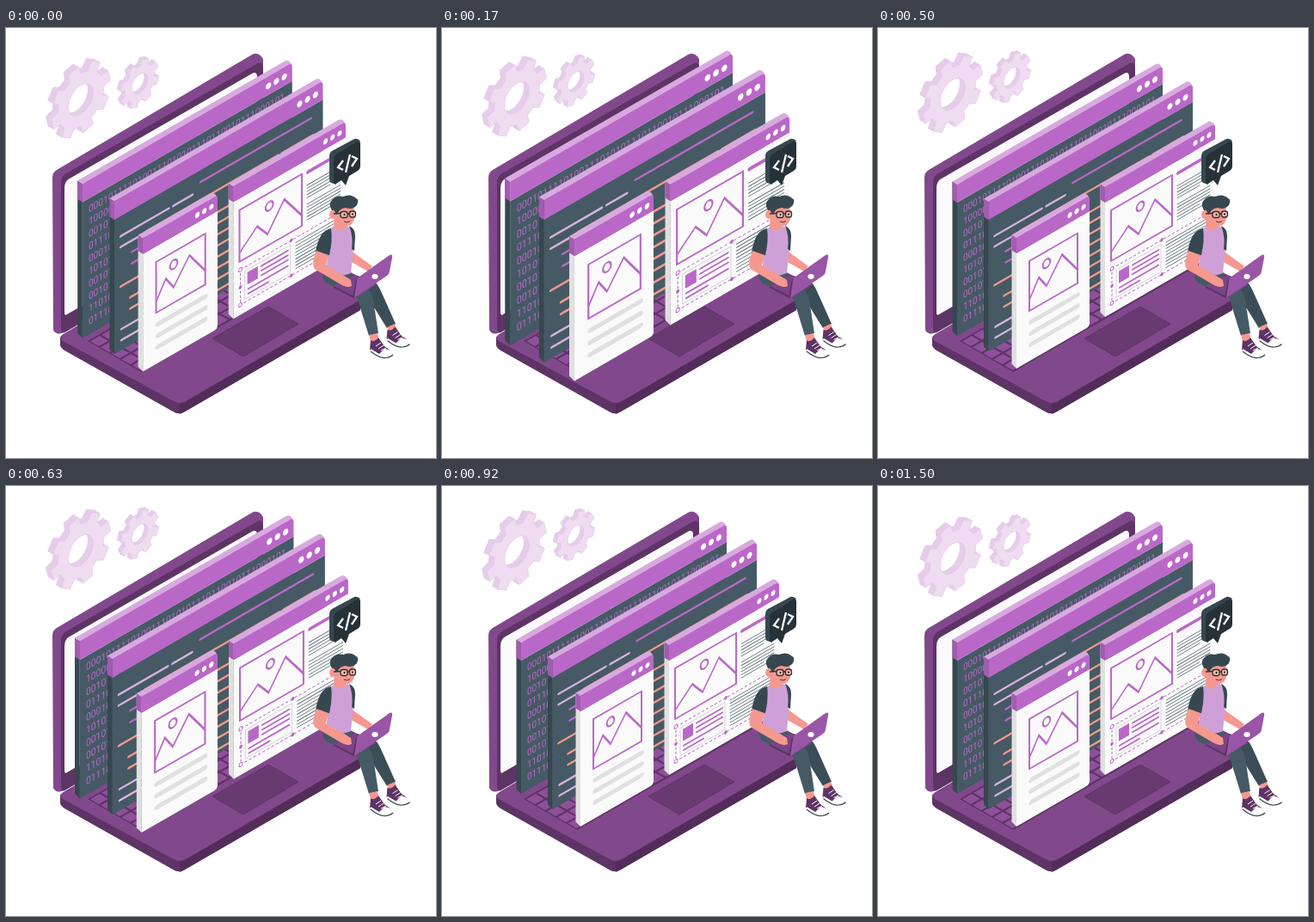
Animation of 500x500 px, one loop 1.54 s. Source, as an HTML page:

```html
<!DOCTYPE html>
<html lang="en">
<head>
<meta charset="utf-8">
<title>Web development</title>
<style>
html, body { margin: 0; width: 100%; height: 100%; overflow: hidden; background: #fff; }
svg { display: block; width: 100vw; height: 100vh; }
text { font: 11.5px Roboto, Arial, sans-serif; fill: #ba68c8; }
</style>
</head>
<body>
<svg viewBox="0 0 500 500">
  <g id="gears"></g>

  <g id="lid">
    <path fill="#82488c" d="M54 174Q54 168 59 165L286 31Q291 28 296 32L299 36V220L68 354Q58 358 55 351Z"/>
    <path fill="#5d3465" d="M64 180Q64 173 70 169L291 42Q299 37 299 47V220L68 354Q64 355 64 349Z"/>
    <path fill="#fafafa" d="M68 186Q68 178 74 175L286 53Q292 50 292 57V205L71 333Q68 335 68 331Z"/>
  </g>

  <g id="base">
    <path fill="#5d3465" d="M63 359V369Q64 373 70 376L196 447Q202 450 208 446L412 328V300Z"/>
    <path fill="#532d5a" d="M202 436V449L208 446L412 328V310Z"/>
    <path fill="#82488c" d="M68 355Q59 360 68 365L195 434Q202 438 209 434L412 316V290L290 225Z"/>
    <g id="keys" transform="matrix(.866 -.5 .866 .5 95 364)"></g>
    <path fill="#693a72" stroke="#5d3465" d="M240 361L305 324L340 344L276 382Z"/>
  </g>

  <g id="windows"></g>

  <g id="bubble">
    <path fill="#37474f" d="M376 148Q376 145 379 143L405 129Q408 128 412 131L384 150L384 182L378 180Q376 179 376 176Z"/>
    <path fill="#263238" d="M381 152Q381 149 384 147L408 132Q412 130 412 134V161Q412 164 409 166L399 172L395 183L390 177L384 181Q381 182 381 179Z"/>
    <path fill="none" stroke="#fff" stroke-width="2.3" d="M392 154L386 162L392 165M400 147L395 168M402 149L408 152L402 161"/>
  </g>

  <g id="person">
    <g fill="#455a64">
      <path d="M396 285L424 292Q432 296 436 306L453 344L443 349L420 312Z" fill="#3b4d57"/>
      <path d="M369 282Q366 292 374 298L398 307Q407 310 410 319L422 358L433 355L427 316Q424 302 412 296L398 283Z"/>
    </g>
    <g fill="#f5988f">
      <path d="M443 348L452 344L455 352L447 355Z"/>
      <path d="M422 357L432 355L434 364L425 367Z"/>
    </g>
    <g id="shoe">
      <path fill="#5d3465" d="M424 363Q428 366 433 360L440 370L447 375L436 381L423 374Z"/>
      <path fill="#fff" d="M440 373Q449 374 450 379Q446 384 438 383L424 376V373L434 379Z"/>
      <path fill="none" stroke="#37474f" stroke-width="1.2" d="M424 376Q434 384 441 383.500Q447 383 450 380"/>
      <path fill="none" stroke="#fff" d="M430 370L436 366M433 373L439 369M436 375L442 372"/>
    </g>
    <use href="#shoe" x="19.500" y="-12.500"/>

    <path fill="#f5988f" d="M400 258L408 264L426 277L421 283L398 270Z"/>
    <path fill="#cfa0d8" d="M377 234L387 228L402 232Q406 240 404 256L401 285Q386 292 372 284L375 258Z"/>
    <path fill="#37474f" d="M378 233Q364 235 360 261Q368 266 376 264Q380 247 378 233ZM399 230Q406 233 406 242L405 259L402 257Q404 242 399 230Z"/>

    <path fill="#f5988f" d="M382 216L381 232Q388 239 395 232L396 224Z"/>
    <path fill="#f5988f" d="M381 206Q377 214 382 222Q386 231 394 231Q405 230 405.500 218L404 204Z"/>
    <ellipse cx="380" cy="217" rx="4" ry="5" fill="#f5988f"/>
    <path fill="#37474f" d="M383 215Q382 211 379 212Q374 204 380 199Q384 194 392 196Q401 192 407 198Q411 199 408 206Q403 212 395 209Q388 210 386 215Z"/>
    <g fill="none" stroke="#263238" stroke-width="1.300">
      <rect x="389" y="213.500" width="8" height="7" rx="2.500" fill="#f7b6ad"/>
      <rect x="399.500" y="213" width="7" height="7" rx="2.500" fill="#f7b6ad"/>
      <path d="M381 216L389 215.500M397 216H399.500"/>
      <path d="M393 225Q397 227 400 224.500" stroke-width=".9"/>
    </g>
    <circle cx="393.500" cy="217" r="1"/><circle cx="403" cy="216.500" r="1"/>

    <path fill="#7b4486" d="M381 300L405 287L430 299L405 314Z"/>
    <path fill="#5d3465" d="M381 300L405 312V314.500L381 302Z"/>
    <path fill="#f5988f" d="M361 259Q354 276 360 281L389 298Q397 303 402 300L401 293L393 288L372 276L375 264Z"/>
    <path fill="#5d3465" d="M405 314L409 293L407 292L403 312Z"/>
    <path fill="#9a56a6" d="M408 294Q408 291 411 289L446 264Q450 262 449 267L446 283Q446 286 443 288L405 314Z"/>
    <ellipse cx="429" cy="289" rx="3.600" ry="3" fill="#fff"/>
  </g>
</svg>

<script>
const PURPLE = '#ba68c8', LILAC = '#d9b3e0', SALMON = '#f5988f', GREY = '#e0e0e0', DARK = '#455a64';
const SLOPE = 0.577;
const $ = id => document.getElementById(id);
const repeat = (n, fn) => Array.from({ length: n }, (_, i) => fn(i)).join('');

// Horizontal stroke in window coordinates
const line = (x0, x1, y, color, width = 2.6) =>
  `<path d="M${x0} ${y}H${x1}" stroke="${color}" stroke-width="${width}" stroke-linecap="round"/>`;

const dot = (x, y, rx, fill = '#fff', stroke = 'none') =>
  `<ellipse cx="${x}" cy="${y}" rx="${rx}" ry="${rx * 1.155}" fill="${fill}" stroke="${stroke}"/>`;

function appWindow({ x, y, w, h, bar, face, side, dots, content }) {
  const dx = -5.5, dy = -6.7;
  return `<g transform="matrix(1 ${-SLOPE} 0 1 ${x} ${y})">
    <path fill="${side}" d="M0 0L${dx} ${dy}V${h + dy - 2}L0 ${h}Z"/>
    <path fill="#a45bb1" d="M0 0L${dx} ${dy}V${bar + dy}L0 ${bar}Z"/>
    <path fill="#d8a9df" d="M0 0L${dx} ${dy}H${w + dx - 3}Q${w - 3} ${dy} ${w} 4Z"/>
    <path fill="${face}" d="M0 ${bar}H${w}V${h - 4}Q${w} ${h} ${w - 4} ${h}H0Z"/>
    <path fill="${PURPLE}" d="M0 0H${w - 4}Q${w} 0 ${w} 5V${bar}H0Z"/>
    ${dots.map(u => dot(u, bar / 2 + 0.3, w > 200 ? 3 : 2.6)).join('')}
    ${content}</g>`;
}

const picture = (x, y, w, h, sunX, sunY, peaks) => `<g fill="none" stroke="${PURPLE}" stroke-width="2">
  <rect x="${x}" y="${y}" width="${w}" height="${h}"/>
  ${dot(sunX, sunY, 4.3, 'none', PURPLE)}<path d="M${peaks}"/></g>`;

const bits = ['0001011110100111010101110110010111000101', '100001', '001010', '011101', '000101',
  '101011', '001010', '001011', '110100', '011101'];
const binary = '<g transform="scale(.866 1)">' +
  bits.map((row, i) => `<text x="8" y="${37 + i * 14.2}">${row}</text>`).join('') + '</g>';

const code = [
  [98, 224, 34.6, PURPLE], [7, 62, 43.8, LILAC], [67, 89, 43.8, LILAC],
  [7, 30, 56, LILAC], [36, 186, 55, SALMON], [191, 226, 55, SALMON],
  [20, 60, 69, PURPLE], [20, 60, 82, PURPLE], [7, 60, 101, SALMON],
  [18, 60, 119.7, SALMON], [18, 60, 132.4, SALMON], [8, 60, 150, LILAC], [8, 60, 162.6, LILAC]
].map(a => line(...a)).join('') + repeat(8, i => line(100, 140, 80 + i * 12.7, SALMON));

const card = picture(15, 35.7, 56, 58, 35, 50, '15 81L26 61L35 76L53 50L71 78') +
  repeat(3, i => line(17, 71, 107.5 + i * 13, GREY, 5.5));

const article = picture(7, 31, 71, 59, 41, 46, '7 80L27 61L39 77L58 48L78 78') +
  line(85, 120, 32.5, PURPLE, 4) +
  repeat(12, i => i == 5 ? '' : line(84, i % 6 == 4 ? 110 : 122, 47 + i * 3.6, DARK, 0.8)) +
  repeat(9, i => line(71, 121, 105 + i * 3.7, DARK, 0.8)) +
  `<rect x="8" y="99.500" width="116" height="40" fill="none" stroke="${PURPLE}" stroke-dasharray="3 2"/>
   <rect x="13" y="104" width="52" height="32" fill="none" stroke="#ccc" stroke-width=".7"/>
   <rect x="16" y="107" width="12" height="14" fill="${PURPLE}"/>` +
  repeat(3, i => line(32, 62, 109 + i * 5.3, PURPLE, 2)) +
  repeat(2, i => line(17, 62 - i * 22, 126.5 + i * 5.3, PURPLE, 2)) +
  dot(8, 99.5, 1.9, '#fff', PURPLE) + dot(8, 139.5, 1.9, '#fff', PURPLE) +
  dot(8, 119.5, 1.8, PURPLE) + dot(66, 99.5, 1.8, PURPLE) + dot(66, 139.5, 1.8, PURPLE);

const dark = { face: DARK, side: '#37474f' }, light = { face: '#fafafa', side: GREY };
$('windows').innerHTML = [
  { x: 92, y: 182, w: 239, h: 176, bar: 21, ...dark, dots: [212, 221, 230], content: binary },
  { x: 128.5, y: 202, w: 237.5, h: 174, bar: 21, ...dark, dots: [211, 220, 229], content: code },
  { x: 161, y: 244, w: 85, h: 152, bar: 18, ...light, dots: [62, 70, 78], content: card },
  { x: 264, y: 185, w: 128, h: 151, bar: 18, ...light, dots: [105, 113, 121], content: article }
].map(appWindow).join('');

$('keys').innerHTML = '<rect width="240" height="72" fill="#5d3465"/>' +
  repeat(5, r => repeat(16, c =>
    `<rect x="${1.5 + c * 15}" y="${2 + r * 14}" width="12.500" height="11.500" fill="#8f509a"/>`));

function gear(x, y, radius, turn, depth) {
  const at = (r, a) => (r * Math.cos(a)).toFixed(1) + ' ' + (r * Math.sin(a)).toFixed(1);
  const inner = radius * 0.77, hole = radius * 0.42;
  const teeth = Array.from({ length: 8 }, (_, i) => {
    const a = (turn + i * 45) * Math.PI / 180;
    return [at(inner, a - 0.25), at(radius, a - 0.17), at(radius, a + 0.17), at(inner, a + 0.25)]
      .join('L') + `A${inner} ${inner} 0 0 1 ${at(inner, a + 0.535)}`;
  }).join('L');
  const shape = `M${teeth}ZM${hole} 0A${hole} ${hole} 0 1 0 ${-hole} 0A${hole} ${hole} 0 1 0 ${hole} 0Z`;
  const layer = (k, fill, stroke) => `<path d="${shape}" fill="${fill}" stroke="${stroke}" stroke-width=".6"
    fill-rule="evenodd" transform="matrix(.866 -.5 0 1 ${x - k} ${y - k * SLOPE})"/>`;
  return layer(depth, '#e6cdea', '#dcbde2') +
    repeat(depth, i => layer(depth - i - 0.5, '#e6cdea', '#e6cdea')) + layer(0, '#efdcf1', '#e2c8e7');
}
$('gears').innerHTML = gear(87, 84, 40, -14, 6) + gear(155.5, 65, 26, -27, 4);

// Two beats, then rest: [ms, scale]
const beat = [[0, 1], [150, 1.1], [450, 1], [600, 1], [750, 1.1], [900, 1], [1500, 1]];
function scaleAt(ms) {
  const i = Math.max(1, beat.findIndex(([t]) => t >= ms));
  const [t0, a] = beat[i - 1], [t1, b] = beat[i];
  return a + (b - a) * (ms - t0) / (t1 - t0);
}

function draw(now) {
  const ms = Math.min(now % 1540 + 30, 1500);
  const lift = 10 * (1 - Math.abs(ms / 750 - 1));
  $('gears').setAttribute('transform', `translate(0 ${-lift})`);
  $('windows').setAttribute('transform', `translate(246 222) scale(${scaleAt(ms)}) translate(-246 -222)`);
}
const start = performance.now();
function tick() {
  draw(performance.now() - start);
  requestAnimationFrame(tick);
}
tick();
</script>
</body>
</html>
```
